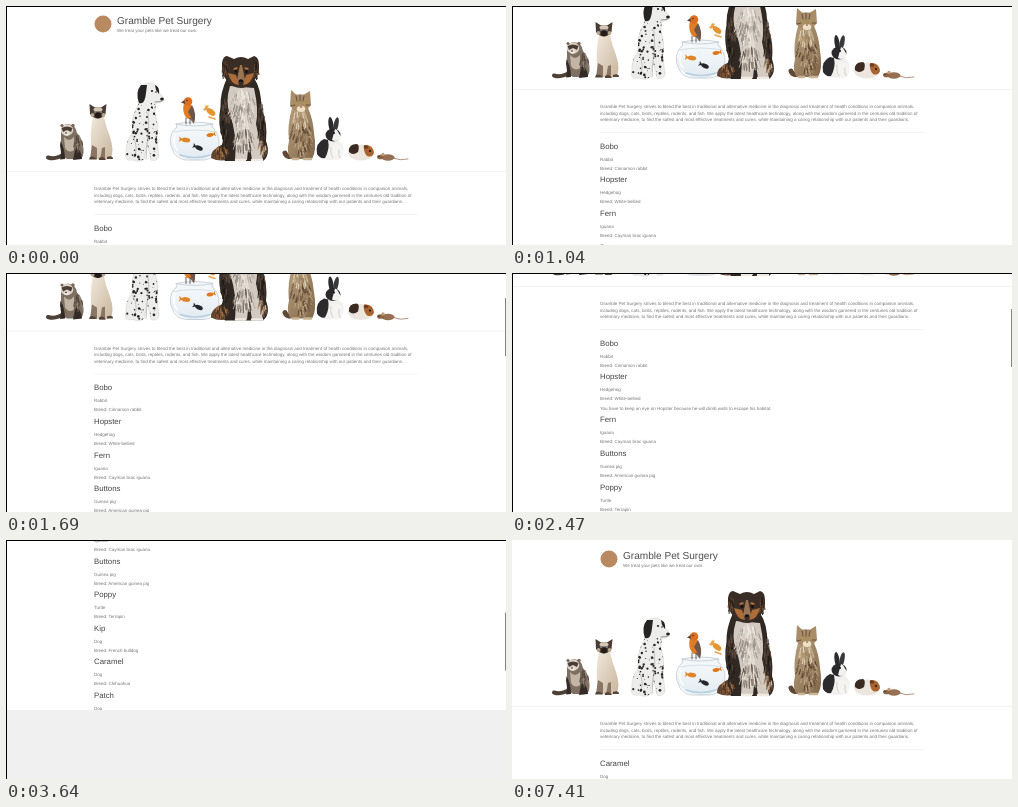
These frames come from a looping animation (500 px wide and 239 px high, 7540 ms). An HTML page:

```html
<!DOCTYPE html>
<html lang="en">
<head>
<meta charset="utf-8">
<title>Pet clinic page</title>
<style>
  html, body { margin: 0; width: 100%; height: 100%; overflow: hidden; background: #fff; }
  svg { display: block; width: 100vw; height: 100vh; }
  text { font: 4.5px "Liberation Sans", Arial, sans-serif; fill: #777; text-rendering: geometricPrecision; }
  .title { font-size: 10.1px; fill: #4c4c4c; }
  .name { font-size: 7.8px; fill: #444; }
</style>
</head>
<body>
<svg id="stage" viewBox="0 0 500 239" preserveAspectRatio="none">
  <defs>
    <clipPath id="coat"><path id="coatShape"/></clipPath>
    <linearGradient id="water" x2="0" y2="1"><stop stop-color="#f8fafb"/><stop offset="1" stop-color="#e2ebf1"/></linearGradient>
    <linearGradient id="tabby" x2="1" y2="1"><stop stop-color="#b69d7b"/><stop offset="1" stop-color="#80674b"/></linearGradient>
    <linearGradient id="cream" x2="1" y2="1"><stop stop-color="#f0e7da"/><stop offset="1" stop-color="#c8b59d"/></linearGradient>
  </defs>
  <rect width="500" height="239" fill="#fff"/>
  <g id="page">
    <circle cx="97" cy="18" r="8.5" fill="#b98a62"/>
    <text class="title" x="111" y="18.4">Gramble Pet Surgery</text>
    <text x="111" y="26.4">We treat your pets like we treat our own.</text>
    <g id="animals"></g>
    <path d="M0 165.5H500M88 208.5H412" stroke="#f2f2f2" stroke-width=".8"/>
    <text x="88" y="184.2">Gramble Pet Surgery strives to blend the best in traditional and alternative medicine in the diagnosis and treatment of health conditions in companion animals,</text>
    <text x="88" y="190.6">including dogs, cats, birds, reptiles, rodents, and fish. We apply the latest healthcare technology, along with the wisdom garnered in the centuries old tradition of</text>
    <text x="88" y="197">veterinary medicine, to find the safest and most effective treatments and cures, while maintaining a caring relationship with our patients and their guardians.</text>
    <g id="pets"></g>
    <rect id="blank" y="472" width="500" height="400" fill="#f0f0f0"/>
  </g>
  <rect id="thumb" x="499" width="1" height="58" fill="#333"/>
  <path id="edge" d="M0 .5H500M.5 0V239" stroke="#000"/>
</svg>
<script>
const $ = id => document.getElementById(id);

function add(parent, tag, attrs, content = '') {
  const el = document.createElementNS('http://www.w3.org/2000/svg', tag);
  for (const key in attrs) el.setAttribute(key, attrs[key]);
  el.textContent = content;
  return parent.appendChild(el);
}
const animals = $('animals');
const shape = (fill, d, more) => add(animals, 'path', { fill, d, ...more });
const oval = (fill, cx, cy, rx, ry = rx, turn = 0) =>
  add(animals, 'ellipse', { fill, cx, cy, rx, ry, transform: `rotate(${turn} ${cx} ${cy})` });
const line = (stroke, d, width = 1) =>
  shape('none', d, { stroke, 'stroke-width': width, 'stroke-linecap': 'round' });

function random(seed) {
  return () => (seed = seed * 16807 % 2147483647) / 2147483647;
}

// short hanging strands that fan out from the middle of an oval
function fur(colors, cx, cy, rx, ry, count, length = 5) {
  const next = random(Math.round(cx * 971 + cy * 13));
  for (let i = 0; i < count; i++) {
    const angle = next() * 2 * Math.PI, reach = Math.sqrt(next());
    const dx = rx * reach * Math.cos(angle), dy = ry * reach * Math.sin(angle);
    line(colors[i % colors.length], `M${cx + dx} ${cy + dy}q${dx * .05} ${length / 2} ${dx * .2} ${length}`, .9);
  }
}

function drawFerret() {
  line('#4e4037', 'M58 148Q50 154 42 151.500', 4);
  shape('#7d6f62', 'M55 127Q56 118 62 118Q70 119 71 127Q77 133 77.500 143Q78 151 74 153L61 153Q53 150 55 139Z');
  shape('#c2b5a6', 'M58 131Q63 137 68 131L68 144Q63 148 59 142Z');
  shape('#342b26', 'M54.500 135Q59 143 59 153L54 153.500Q56 146 54 140ZM70 139Q76 147 76 153L67 154Z');
  fur(['#5d5046', '#968778', '#4b4038'], 72, 137, 4, 8, 24, 4);
  oval('#ddd5ca', 61, 124, 6.300, 5.700);
  shape('#4a3d35', 'M55.500 122Q61 119 66.500 122L65 126L61 124L57 126Z');
  oval('#f0e9e0', 60.500, 128, 2.300, 1.800);
  oval('#31251f', 60, 127, .9, .7);
  oval('#7a6859', 56, 119.500, 1.600);
  oval('#7a6859', 67, 119.500, 1.700);
}

function drawSiamese() {
  shape('url(#cream)', 'M87 111Q83 126 86 151L94 154L104 153Q109 146 104 131Q100 121 98 111Z');
  shape('#8a7463', 'M86 139L84 153H91L91 142ZM96 142L94 154H99L99 141Z');
  shape('#55443a', 'M84 151Q88 149 91 153.500H83ZM93 152Q97 149 100 154H93ZM101 151Q107 149 107 153H101Z');
  shape('#4a3b33', 'M84 108L83.500 98L89 101.500H95L100.500 98L99.500 108Q92 117 84 108Z');
  oval('#d6c8b5', 92, 103.500, 4.500, 2);
  oval('#b6a48f', 86.500, 109, 1.800, 2);
  oval('#b6a48f', 97.500, 109, 1.800, 2);
  oval('#231b17', 92, 109.500, 3, 2.800);
  oval('#8eabc0', 89, 106, 1, .8);
  oval('#8eabc0', 95, 106, 1, .8);
}

function drawDalmatian() {
  const body = 'M133 84Q136 76 145 77Q151 78 152 85L157.500 92Q157 98 150 97Q149 101 149 108Q153 118 151 132L153 151Q150 156 145 154L141 137L138 153Q134 157 127 154Q117 156 120 146Q119 138 126 127Q125 111 132 99Z';
  $('coatShape').setAttribute('d', body);
  shape('#ededeb', body, { stroke: '#d2d1cf', 'stroke-width': .5 });
  line('#bdbbb8', 'M142 107Q144 122 141 138L140 153M127 130Q133 142 128 151', .9);
  const spots = add(animals, 'g', { 'clip-path': 'url(#coat)', fill: '#262524' });
  const next = random(31);
  for (let i = 0; i < 110; i++)
    add(spots, 'circle', { cx: 120 + next() * 34, cy: 97 + next() * 58, r: .4 + next() * .95 });
  shape('#252323', 'M135 79Q129 86 133 97Q139 99 140 87L141 79ZM149 79Q154 81 153 88L150 84Z');
  oval('#222', 156, 93, 1.900, 1.500);
  oval('#222', 146, 85, 1.100);
  oval('#222', 150, 86, .8);
  line('#555', 'M149 96Q153 96 156 95', .6);
}

function fish(color, x, y, size, turn = 0) {
  oval(color, x, y, size, size * .55, turn);
  shape(color, `M${x - size * .7} ${y}l${-size} ${-size * .6}l${size * .25} ${size * .7}l${-size * .2} ${size * .6}Z`,
    { transform: `rotate(${turn} ${x} ${y})` });
}

function drawBowl() {
  oval('url(#water)', 189, 136, 24, 18.500);
  shape('#f3f7f9', 'M171 118Q188 114 207 118L210 124Q188 120 168 124Z');
  line('#bfcad1', 'M170 118Q188 122 207 118Q188 114 170 118L171 121Q159 131 168 147Q172 153 180 154H198Q207 153 211 146Q217 131 206 121V118', .8);
  line('#c9d9e4', 'M167 126Q189 122 210 126', .8);
  line('#b9d0e0', 'M174 149Q189 154 204 149', 1.500);
  line('#fff', 'M169 129Q166 138 171 144', 1.500);
  fish('#e08428', 180, 134, 4.300, 8);
  fish('#df7920', 204, 129, 3.500, 170);
  fish('#242629', 193, 142, 4, 25);
  fish('#e49430', 205, 106, 5, 38);
  line('#e9a34a', 'M199 104L202 100M203 111L209 113', 1.500);
  // bird on the rim
  shape('#7b695f', 'M184 101Q191 108 188 118L184 113Z');
  oval('#e27c22', 182, 104, 4.700, 9, -8);
  oval('#dc6f20', 182, 95.500, 4.300);
  shape('#6e564a', 'M186 99Q191 108 188 116L182 106Z');
  shape('#5a4436', 'M178.500 94L175 96.500L179 98Z');
  oval('#241c18', 181, 94.500, .7);
  line('#473a33', 'M180 112V118M184 112V118', .8);
}

function drawCollie() {
  shape('#5e4330', 'M217 138Q204 144 205 152Q215 157 227 152Z');
  shape('#2f2823', 'M221 72Q214 87 214.500 101Q211 118 217 134Q213 148 219 155H257Q265 149 260 135Q262 117 255 101Q256 84 248 72Z');
  shape('#d3cbc2', 'M224 80Q219 96 224 108L227 119L230 136L229 154H241L243 135L246 154H257L253 132L250 118Q253 104 248 82Z');
  fur(['#4a3c32', '#1d1917', '#65503f'], 219, 114, 4, 22, 50);
  fur(['#4a3c32', '#1d1917', '#65503f'], 255, 116, 3.500, 20, 45);
  fur(['#f2ede6', '#b7aca1', '#e4dcd2', '#8f857c'], 236, 101, 12, 19, 130, 6);
  fur(['#efe8df', '#b3a79b', '#86786c', '#574a41'], 238, 133, 10, 10, 60, 6);
  fur(['#8b5b37', '#3c2b21', '#b17b4d'], 215, 145, 7, 5, 38, 4);
  fur(['#6d4a31', '#ab8460', '#d7cabb'], 256, 142, 4, 8, 28, 4);
  shape('#392d26', 'M221 75Q215 68 216 57Q217 50 221 50L228 53Q235 49 242 53L248 50Q253 51 253 59Q253 70 247 76Q241 82 235 82Q226 82 221 75Z');
  fur(['#6b4931', '#221c18'], 219, 63, 2.500, 8, 22, 4);
  fur(['#6b4931', '#221c18'], 250, 63, 2.500, 8, 22, 4);
  shape('#ac6d38', 'M222 67L230 69L233 79Q225 79 222 67ZM248 67L240 69L237 79Q245 79 248 67Z');
  oval('#b87138', 229.500, 62.500, 2.300, 1.100, -15);
  oval('#b87138', 240.500, 62.500, 2.300, 1.100, 15);
  oval('#14110f', 230, 65.500, 1.500);
  oval('#14110f', 240.500, 65.500, 1.500);
  shape('#9b7455', 'M234 59H236L239 74Q235 80 231 74Z');
  oval('#171412', 235, 75, 2.400, 1.800);
  line('#f0eae2', 'M230 154H239M246 154H256', 2.500);
}

function drawTabby() {
  line('#5f4936', 'M290 149Q281 153 279 147', 5);
  shape('url(#tabby)', 'M286 102Q281 119 283 135Q280 147 285 153H306Q311 145 308 127Q307 113 302 102Z');
  fur(['#6b523b', '#a98f6d', '#c5ad8a', '#543f2e'], 295, 130, 10, 17, 100, 4);
  fur(['#e5d7be', '#c4ae8c', '#a18664'], 294, 112, 7, 8, 55);
  shape('#a98d68', 'M284 100L285 84L290 88.500H298L304 85L305 99Q295 112 284 100Z');
  line('#624b36', 'M290 90L291 95M294 89V95M298 90L297 95M285 100L289 99M304 99L300 99', .9);
  oval('#eee0c7', 295, 103, 4.300, 3);
  oval('#a6a052', 290.500, 97.500, 1.400, 1.100);
  oval('#a6a052', 298.500, 97.500, 1.400, 1.100);
  oval('#8e5649', 295, 101, 1.200, .8);
  line('#c9b495', 'M287 153H292M298 153H305', 2.500);
}

function drawRabbit() {
  oval('#f1f0ed', 324, 143, 13.500, 11);
  shape('#2b2a2c', 'M318 133Q309 137 311 148Q314 153 319 152Q324 143 322 134Z');
  oval('#2b2a2d', 325, 119, 2.500, 8, -8);
  oval('#39383b', 330, 119, 2.400, 8, 12);
  oval('#2a292b', 327, 129, 7.500, 6.500);
  shape('#f4f2ef', 'M329 123L331 124L335 131Q331 137 326 134Z');
  oval('#111', 328, 127, 1);
  oval('#f5f4f1', 330, 146, 7.500, 8);
  line('#c6c2be', 'M325 141Q324 148 327 152M333 144Q332 149 334 152', .7);
}

function drawRodents() {
  oval('#ece6df', 355, 146.500, 13, 8);
  shape('#3a2a22', 'M343 146Q342 138 351 138Q354 139 352 146Q347 150 343 146Z');
  shape('#a8642f', 'M358 139Q367 138 368 147Q366 152 361 150Q357 146 358 139Z');
  oval('#6e3c20', 360, 141, 2.300, 1.700);
  oval('#17120f', 364, 145, 1);
  line('#a98873', 'M387 152Q394 155 402 153', .9);
  oval('#967052', 382, 151.500, 6.500, 3.200);
  oval('#8d6548', 374.500, 151, 3.500, 2.300);
  oval('#c2997b', 377, 148.500, 1.700);
  oval('#17120f', 373, 150.500, .6);
}

for (const draw of [drawFerret, drawSiamese, drawDalmatian, drawBowl, drawCollie, drawTabby, drawRabbit, drawRodents]) draw();

const FIRST_ROW = 224.8, ROW = 33.6, NOTE = 9.4, HOPSTER = 1, CARAMEL = 6;
const pets = [
  ['Bobo', 'Rabbit', 'Cinnamon rabbit'],
  ['Hopster', 'Hedgehog', 'White-bellied', 'You have to keep an eye on Hopster because he will climb walls to escape his habitat.'],
  ['Fern', 'Iguana', 'Cayman brac iguana'],
  ['Buttons', 'Guinea pig', 'American guinea pig'],
  ['Poppy', 'Turtle', 'Terrapin'],
  ['Kip', 'Dog', 'French bulldog'],
  ['Caramel', 'Dog', 'Chihuahua', 'Caramel is a 7-year-old long hair Chihuahua with a very pleasant, laid back, temperament.'],
  ['Patch', 'Dog', 'Jack Russell terrier'],
  ['Doodle', 'Dog', 'Mixed breed'],
  ['Koa', 'Dog', 'Mixed breed']
].map(([name, kind, breed, note = '']) => {
  const row = add($('pets'), 'g', {});
  add(row, 'text', { x: 88, class: 'name' }, name);
  add(row, 'text', { x: 88, y: 12 }, kind);
  add(row, 'text', { x: 88, y: 21 }, 'Breed: ' + breed);
  return { row, note: add(row, 'text', { x: 88, y: 21 + NOTE }, note) };
});

// start time, scroll offset, pet with its note open, scrollbar opacity
const LOOP = 7540, DETAIL = 7410;
const steps = [
  [0, 0, -1, 0], [780, 38, -1, 0], [1040, 82, -1, 0],
  [1300, 95, -1, .6], [1560, 103, -1, .6], [1690, 107.5, -1, .6],
  [1950, 152, -1, .7], [2470, 152, HOPSTER, .6],
  [3250, 200, -1, .6], [3380, 259, -1, .6], [3640, 302, -1, .6],
  [4030, 312.3, -1, .6], [4160, 312.3, CARAMEL, .6],
  [4550, 312.3, CARAMEL, .3], [4940, 312.3, CARAMEL, .08],
  [DETAIL, -1, -1, 0]
];
const show = (el, on) => el.setAttribute('display', on ? 'inline' : 'none');

function render(t) {
  const [start, scroll, open, bar] = steps.findLast(step => step[0] <= t);
  const detail = start === DETAIL;
  $('page').setAttribute('transform', `translate(0 ${-scroll})`);
  let y = FIRST_ROW;
  pets.forEach(({ row, note }, i) => {
    const visible = !detail || i === CARAMEL;
    show(row, visible);
    show(note, i === open);
    row.setAttribute('transform', `translate(0 ${y})`);
    if (visible && !detail) y += ROW + (i === open ? NOTE : 0);
  });
  show($('blank'), t >= 3380 && t < 4030);
  show($('edge'), !detail);
  $('thumb').setAttribute('y', 36 + (scroll - 152) * .244);
  $('thumb').setAttribute('opacity', bar);
}

function tick() {
  render(performance.now() % LOOP);
  requestAnimationFrame(tick);
}
tick();
</script>
</body>
</html>
```
